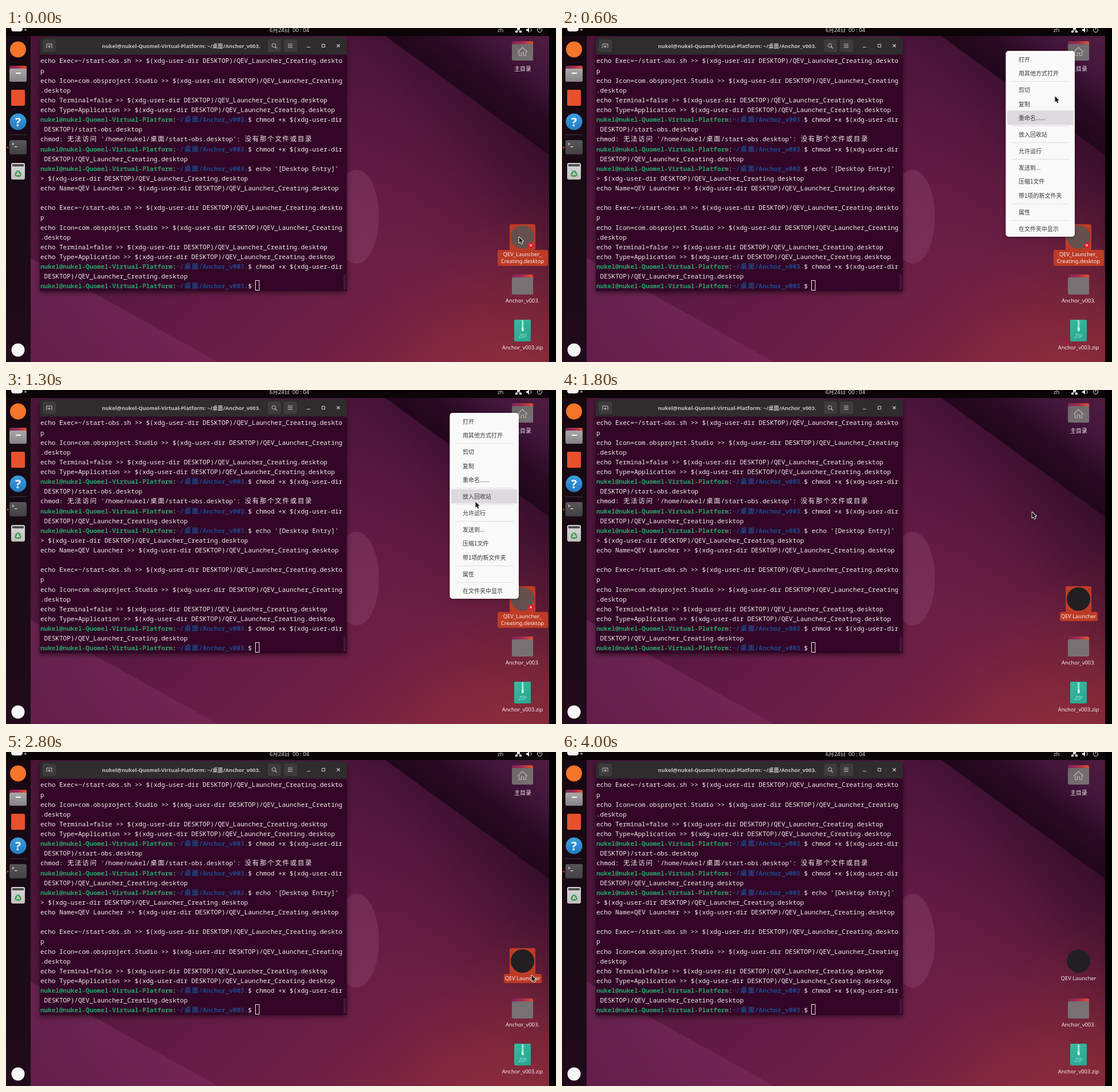
An HTML page with a canvas that plays this animation: 960x584 px, repeating every 4.1 s.

```html
<!DOCTYPE html>
<html lang="zh-CN">
<head>
<meta charset="utf-8">
<title>Desktop launcher</title>
<style>
html, body { margin: 0; width: 100%; height: 100%; overflow: hidden; background: #000; }
canvas { display: block; }
</style>
</head>
<body>
<canvas id="stage" width="960" height="584"></canvas>
<script>
const W = 960, H = 584, LOOP = 4100, STEP = 100;
const SANS = '"Noto Sans", "Noto Sans CJK SC", sans-serif';
const CJK = '"Noto Sans CJK SC", "Noto Sans", sans-serif';
const MONO = '"Noto Sans Mono", "Noto Sans CJK SC", monospace';
const USER = 'nukel', HOST = 'nukel-Quomel-Virtual-Platform', APP = 'QEV Launcher';
const FILE = 'QEV_Launcher_Creating';

const screen = document.getElementById('stage').getContext('2d');
const backdrop = document.createElement('canvas');
backdrop.width = W;
backdrop.height = H;
let c = backdrop.getContext('2d');

function box(x, y, w, h, fill, radius = 0) {
  c.beginPath();
  c.roundRect(x, y, w, h, radius);
  c.fillStyle = fill;
  c.fill();
}

function disc(x, y, r, fill) {
  c.beginPath();
  c.arc(x, y, r, 0, Math.PI * 2);
  c.fillStyle = fill;
  c.fill();
}

function trace(points, closed) {
  c.beginPath();
  points.forEach(([x, y]) => c.lineTo(x, y));
  if (closed) c.closePath();
}

function poly(points, fill) {
  trace(points, true);
  c.fillStyle = fill;
  c.fill();
}

function line(points, color, width = 1) {
  trace(points);
  c.strokeStyle = color;
  c.lineWidth = width;
  c.stroke();
}

function text(str, x, y, font, color, align = 'left') {
  c.font = font;
  c.fillStyle = color;
  c.textAlign = align;
  c.textBaseline = 'alphabetic';
  c.fillText(str, x, y);
}

function ramp(x0, y0, x1, y1, ...colors) {
  const g = c.createLinearGradient(x0, y0, x1, y1);
  colors.forEach((color, i) => g.addColorStop(i / (colors.length - 1), color));
  return g;
}

const label = (str, y, color = '#f4eef2') => text(str, 901.5, y, `9.35px ${SANS}`, color, 'center');

function wallpaper() {
  box(0, 0, W, H, ramp(250, 20, 800, 640, '#4b1539', '#54183f', '#641b46', '#702043', '#8b2c3e'));
  poly([[43, 402], [43, 584], [370, 584]], ramp(130, 450, 70, 584, '#8a346a66', '#7c2c6044'));
  poly([[948, 284], [948, 584], [500, 584]], ramp(720, 430, 940, 580, '#7a204000', '#9c323a88'));
  // Soft shade falling from the dark fold towards the lower left
  box(595, 14, 353, 570, ramp(948, 230, 678, 430, '#200722b0', '#24082478', '#2a0a2838', '#2a0a2812', '#2a0a2800'));
  poly([[662, 14], [948, 222], [948, 14]], ramp(800, 113, 890, -10, '#22071b', '#2b0b24', '#41153a', '#4c1b3e'));
  // Plain stand-in for the wallpaper emblem
  c.beginPath();
  c.ellipse(612, 330, 39, 82, 0, 0, Math.PI * 2);
  c.fillStyle = 'rgba(150,82,118,.32)';
  c.fill();
  box(948, 0, 12, H, '#000');
}

function topBar() {
  box(0, 0, 948, 14, '#0b0508');
  box(9, -3, 20, 9, '#f4f4f4', 4.5);
  disc(34, 3, 2, '#8c878a');
  const bold = `500 9.5px ${SANS}`;
  text('6月24日', 460, 7, bold, '#ddd');
  text('00 : 04', 500, 7, bold, '#ddd');
  text('zh', 858, 7, `9.5px ${SANS}`, '#ddd');
  box(892, 0, 5, 3, '#eee');
  box(889, 5, 4, 3, '#eee');
  box(896, 5, 4, 3, '#eee');
  line([[891, 5], [891, 4], [898, 4], [898, 5]], '#eee');
  poly([[908, 2], [910, 2], [913, -1], [913, 8], [910, 5], [908, 5]], '#eee');
  c.lineWidth = 1;
  c.strokeStyle = '#eee';
  c.beginPath();
  c.arc(913, 3.5, 4, -0.9, 0.9);
  c.stroke();
  c.beginPath();
  c.arc(931.5, 3.5, 4, -1, Math.PI + 1);
  c.stroke();
  line([[931.5, -1], [931.5, 3]], '#eee');
}

function folder(x, y, w, h, body) {
  box(x, y, w, h, ramp(x, 0, x + w, 0, '#7d2653', '#a52b50', '#e2532c'), 3);
  box(x, y + 5, w, h - 5, body, 3);
}

function recycleMark(x, y) {
  for (let i = 0; i < 3; i++) {
    c.save();
    c.translate(x, y);
    c.rotate(i * Math.PI * 2 / 3);
    line([[-4.2, -0.5], [-1.2, -4.8], [1.2, -4.8], [2.6, -2.8]], '#2f9a4c', 2);
    poly([[0.6, -1.8], [4.6, -3.6], [4, 0]], '#2f9a4c');
    c.restore();
  }
}

function dock() {
  box(0, 14, 43, 570, ramp(0, 14, 0, 584, '#170812', '#190a15', '#210b1b'));
  disc(21, 37.5, 14, '#f5752a');
  folder(6, 66, 30, 28, ramp(0, 71, 0, 94, '#aaa7a8', '#858283'));
  box(17, 78, 9, 2, '#fff');
  box(9, 108, 24, 28, '#e7512d', 2);
  disc(21, 164, 14.5, ramp(0, 149, 0, 179, '#3b9fe0', '#2378bd'));
  text('?', 21, 171.5, `600 21px ${SANS}`, '#fff', 'center');
  box(6, 186, 30, 1, '#44363f');
  box(6, 196, 30, 25, ramp(0, 196, 0, 221, '#575556', '#434142'), 3);
  text('>_', 10, 206, `bold 8px ${MONO}`, '#fff');
  disc(3, 209, 1.5, '#d8402b');
  box(9, 236, 24, 29, ramp(0, 236, 0, 265, '#d9d7d6', '#c2c0bf'), 3);
  box(11, 238, 20, 4, '#514d4f', 1);
  recycleMark(21, 255);
  disc(21, 563, 11.5, '#f7f7f7');
}

function desktopIcons() {
  const grey = ramp(883, 24, 920, 60, '#6c6668', '#777173');
  folder(883, 23, 37, 34, grey);
  line([[893, 42], [901.5, 34], [910, 42]], '#bab3b6', 1.3);
  line([[895.5, 41], [895.5, 48.5], [899.5, 48.5], [899.5, 43.5], [903.5, 43.5], [903.5, 48.5],
    [907.5, 48.5], [907.5, 41]], '#bab3b6', 1.2);
  text('主目录', 902, 75, `9.8px ${CJK}`, '#f4eef2', 'center');
  folder(883, 431, 37, 35, grey);
  label('Anchor_v003.', 480);
  box(887, 510, 29, 38, ramp(887, 510, 916, 548, '#35b99f', '#2aa590'), 2);
  for (let y = 511; y < 524; y += 3) {
    box(900, y, 2, 1.5, '#e8fff8');
    box(901.5, y + 1.5, 2, 1.5, '#e8fff8');
  }
  box(900, 524, 3.5, 6, '#e8fff8', 1);
  text('ZIP', 901.5, 542, `italic 500 9.5px ${SANS}`, '#97dfcd', 'center');
  label('Anchor_v003.zip', 562);
}

const CELL = 6.59, ROW = 17.13;

// Terminal grid: wide glyphs take two cells. Returns the next column.
function cells(str, col, row, color, weight = '') {
  for (const ch of str) {
    const wide = ch > '\u2e7f';
    const font = wide ? `${weight} 11.5px ${CJK}` : `${weight} 10.98px ${MONO}`;
    text(ch, 60 + col * CELL + (wide ? 0.8 : 0), 61.4 + row * ROW, font, color);
    col += wide ? 2 : 1;
  }
  return col;
}

function promptLine(command, row) {
  let col = cells(`${USER}@${HOST}`, 0, row, '#2ba269', 'bold');
  col = cells(':', col, row, '#e8e2e6');
  col = cells('~/桌面/Anchor_v003.', col, row, '#1d4a8c', 'bold');
  cells('$ ' + command, col, row, '#f2eef0');
}

function terminal() {
  c.save();
  c.shadowColor = 'rgba(0,0,0,.5)';
  c.shadowBlur = 9;
  c.shadowOffsetY = 3;
  box(59, 16, 536, 444, '#330627', [8, 8, 0, 0]);
  c.restore();
  box(59, 16, 536, 30.5, '#2e2c2d', [8, 8, 0, 0]);
  [64, 457, 485].forEach(x => box(x, 20, 23, 22, '#3d3b3c', 4));
  line([[71, 35], [71, 28], [80, 28], [80, 35]], '#ccc');
  line([[73, 32.5], [78, 32.5]], '#ccc');
  line([[75.5, 30], [75.5, 35]], '#ccc');
  c.beginPath();
  c.arc(467.5, 30.5, 3.2, 0, 7);
  c.stroke();
  line([[470, 33], [472.5, 35.5]], '#ccc', 1.2);
  [28, 31, 34].forEach(y => line([[492, y], [500, y]], '#ccc'));
  line([[525, 33.5], [531, 33.5]], '#ccc');
  c.strokeRect(551.5, 28.5, 5, 5);
  line([[577.5, 28.5], [582.5, 33.5]], '#ccc', 1.2);
  line([[582.5, 28.5], [577.5, 33.5]], '#ccc', 1.2);
  text(`${USER}@${HOST}: ~/桌面/Anchor_v003.`, 305.5, 34.7, `bold 9.27px ${SANS}`, '#c4c2c3', 'center');

  const target = `>> $(xdg-user-dir DESKTOP)/${FILE}`;
  const entry = [
    `echo Exec=~/start-obs.sh ${target}.deskto`, 'p',
    `echo Icon=com.obsproject.Studio ${target}`, '.desktop',
    `echo Terminal=false ${target}.desktop`,
    `echo Type=Application ${target}.desktop`
  ];
  const allow = '$chmod +x $(xdg-user-dir';
  const rest = ` DESKTOP)/${FILE}.desktop`;
  const lines = [
    ...entry, allow, ' DESKTOP)/start-obs.desktop',
    `chmod: 无法访问 '/home/${USER}/桌面/start-obs.desktop': 没有那个文件或目录`,
    allow, rest, "$echo '[Desktop Entry]'", target.slice(1) + '.desktop',
    `echo Name=${APP} ${target}.desktop`, '',
    ...entry, allow, rest, '$'
  ];
  lines.forEach((str, row) => {
    if (str[0] === '$') promptLine(str.slice(1), row);
    else cells(str, 0, row, '#f2eef0');
  });
  c.strokeStyle = '#f2eef0';
  c.lineWidth = 1;
  c.strokeRect(435.5, 441.5, 6.5, 17);
  box(589, 431, 4.5, 27, '#421836', 2);
}

function launcher(allowed, selected) {
  if (selected) {
    box(879, 343, 45, 46, '#bd3b25', 3);
    if (allowed) box(869, 388, 66, 16, '#bd3b25', 3);
    else box(858, 388, 88, 28, '#bd3b25', 3);
  }
  disc(901.5, 365.5, 20.5, allowed ? '#211f21' : '#65504d');
  if (allowed) return label(APP, 398.5);
  disc(916, 380, 5.2, '#d9202c');
  line([[914, 378], [918, 382]], '#fff');
  line([[918, 378], [914, 382]], '#fff');
  label('QEV_Launcher_', 398.5);
  label('Creating.desktop', 410.5);
}

const ITEMS = [
  ['打开', 55], ['用其他方式打开', 79], ['剪切', 108], ['复制', 133], ['重命名……', 157],
  ['放入回收站', 186], ['允许运行', 215], ['发送到…', 244], ['压缩1文件', 268],
  ['带1项的新文件夹', 293], ['属性', 322], ['在文件夹中显示', 351]
];

function menu(hoverY) {
  c.save();
  c.shadowColor = 'rgba(0,0,0,.4)';
  c.shadowBlur = 5;
  c.shadowOffsetY = 1;
  box(774.5, 40, 120.5, 325, '#faf9fa', 5);
  c.restore();
  [93, 171, 200, 229, 307, 336].forEach(y => box(784, y, 102, 1, '#dfdddf'));
  ITEMS.forEach(([name, y]) => {
    if (Math.abs(hoverY - y) <= 12) box(777, y - 12.5, 116, 25, '#dcdadc', 2);
    // Dots sit on the baseline
    text(name.replace(/…/g, '...'), 797, y + 3.8, `10px ${CJK}`, '#3a383a');
  });
}

function pointer([x, y]) {
  c.save();
  c.translate(x, y);
  c.lineJoin = 'round';
  trace([[0.5, 0.5], [0.5, 10.5], [2.8, 8.4], [4.6, 12.2], [6.4, 11.4], [4.7, 7.7], [7.8, 7.5]], true);
  c.strokeStyle = '#f5f5f5';
  c.lineWidth = 1.8;
  c.stroke();
  c.fillStyle = '#1c1a1c';
  c.fill();
  c.restore();
}

// [time, x, y]
const PATH = [
  [0, 895, 365], [200, 895, 365], [500, 867, 157], [600, 860, 119], [800, 850, 132],
  [1300, 819, 195], [1500, 820, 212], [1800, 820, 213], [2100, 822, 215],
  [2600, 912, 378], [2800, 917, 390], [3100, 922, 400], [3400, 965, 430]
];

function pointerAt(t) {
  const i = PATH.findIndex(p => p[0] > t);
  if (i < 0) return PATH[PATH.length - 1].slice(1);
  if (i === 0) return PATH[0].slice(1);
  const [a, b] = [PATH[i - 1], PATH[i]];
  const k = (t - a[0]) / (b[0] - a[0]);
  return [a[1] + (b[1] - a[1]) * k, a[2] + (b[2] - a[2]) * k];
}

function render(t) {
  c.drawImage(backdrop, 0, 0);
  launcher(t >= 1700, t < 3200);
  if (t >= 200 && t < 1700) menu(pointerAt(t - STEP)[1]);
  if (t < 3400) pointer(pointerAt(t));
}

wallpaper();
topBar();
dock();
desktopIcons();
terminal();
c = screen;

const start = performance.now();
function tick() {
  const t = (performance.now() - start) % LOOP;
  render(Math.floor(t / STEP) * STEP);
  requestAnimationFrame(tick);
}
tick();
</script>
</body>
</html>
```
